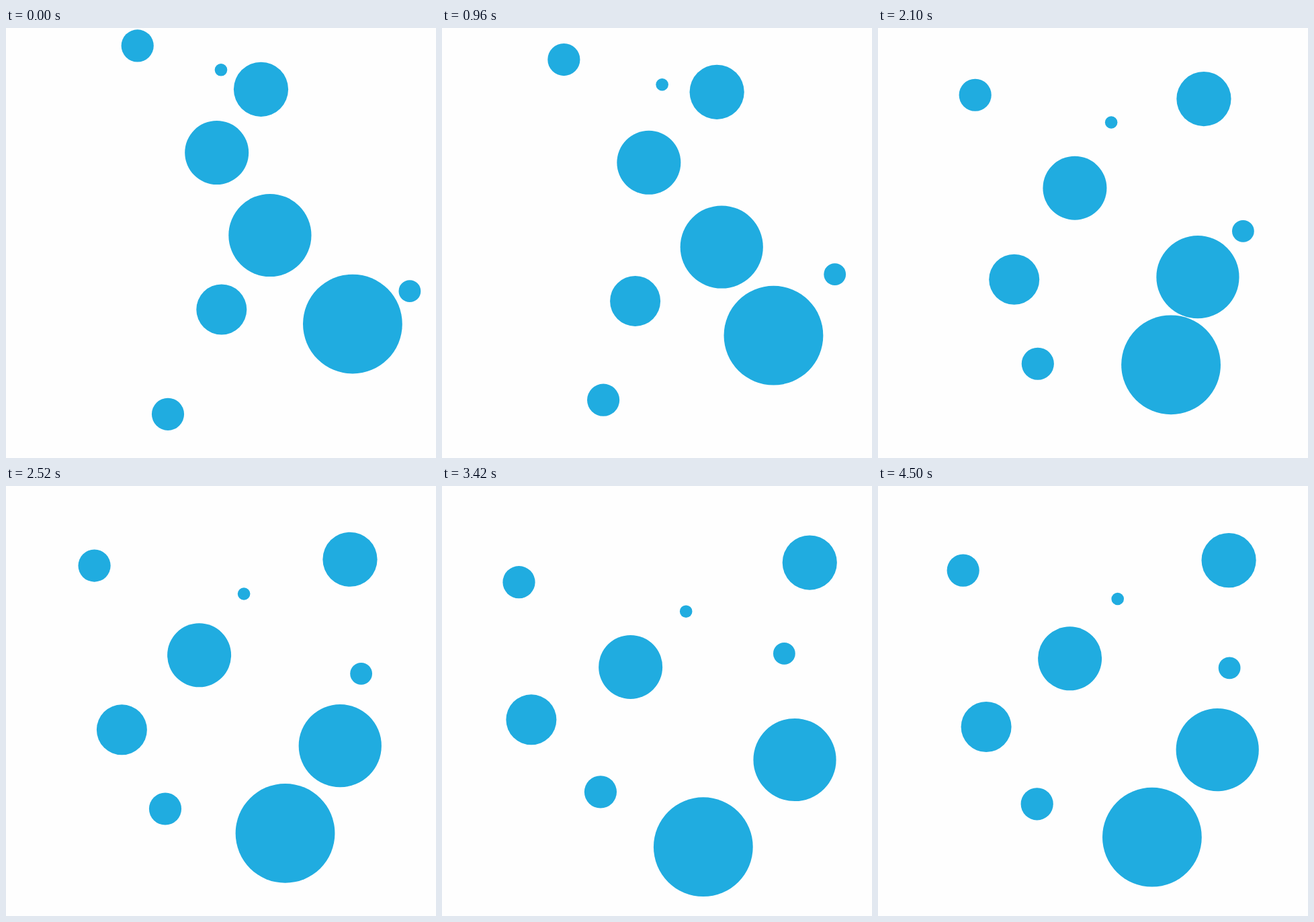
Animation of 640 by 640 pixels, one loop 4.53 s. Source, as an HTML page:

```html
<!DOCTYPE html>
<html lang="en">
<head>
<meta charset="utf-8">
<title>Drifting dots</title>
<style>
  html, body { margin: 0; height: 100%; overflow: hidden; background: #fefefe; }
  svg { display: block; width: 100%; height: 100%; fill: #20ace0; }
</style>
</head>
<body>
<svg id="stage" viewBox="0 0 640 640"></svg>
<script>
const LOOP = 4530, STEP = 30, TRAVEL = 3600;

const smooth = u => u * u * (3 - 2 * u);
const mix = (a, b, p) => a + (b - a) * p;

// Adds a dot and returns a function that moves it along its straight path.
function dot(radius, from, to) {
  const circle = document.createElementNS("http://www.w3.org/2000/svg", "circle");
  circle.setAttribute("r", radius);
  stage.append(circle);
  return p => ["cx", "cy"].forEach((axis, i) =>
    circle.setAttribute(axis, mix(from[i], to[i], p)));
}

const movers = [
  dot(9.3, [320, 62.3], [363.5, 187.6]),
  dot(16.4, [600.9, 391.7], [508.7, 248.4]),
  dot(24.1, [195.7, 26.4], [113.9, 144]),
  dot(24.1, [241, 574.8], [235.9, 454.5]),
  dot(37.5, [320.8, 419], [131.5, 347.3]),
  dot(40.6, [379.5, 91.3], [548.5, 114.2]),
  dot(47.5, [313.7, 185.5], [280.4, 270]),
  dot(61.6, [392.9, 308.5], [526, 408.2]),
  dot(73.9, [515.9, 440.6], [387.9, 537.9]),
];

const start = performance.now();
function tick() {
  const elapsed = (performance.now() - start) % LOOP;
  const time = Math.floor(elapsed / STEP) * STEP;
  // Out, then back until the loop cuts.
  const progress = smooth(1 - Math.abs(1 - time / TRAVEL));
  movers.forEach(move => move(progress));
  requestAnimationFrame(tick);
}
tick();
</script>
</body>
</html>
```
